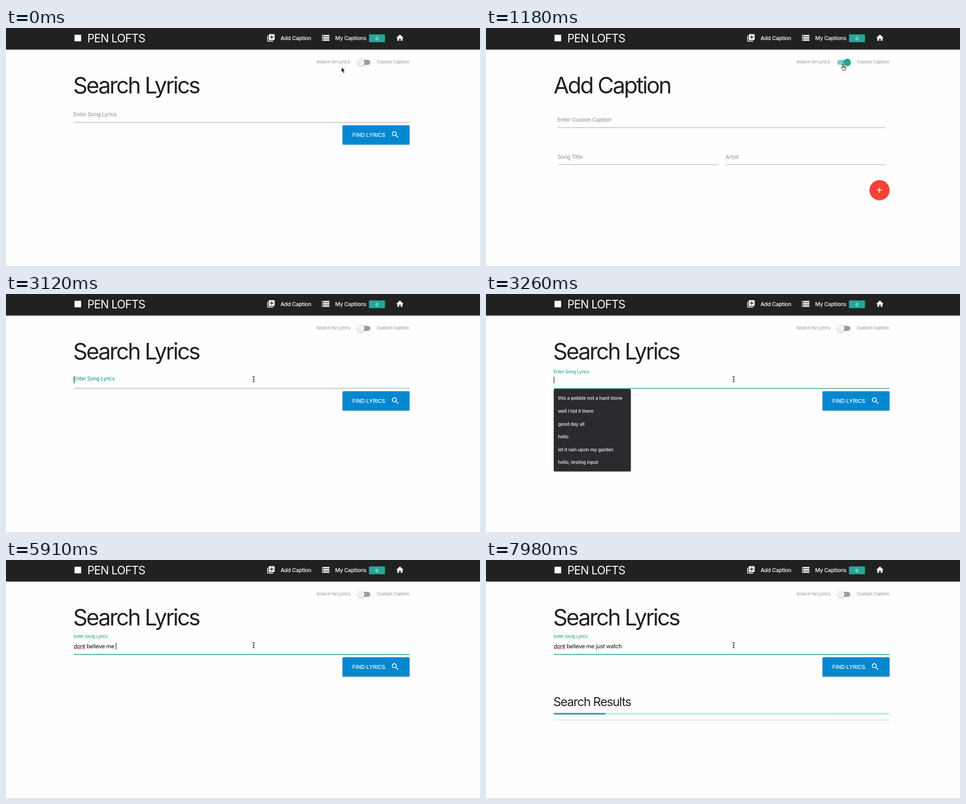
Animation, 1056 px wide and 531 px high, one loop 8 s. Source, as an HTML page:

```html
<!DOCTYPE html>
<html lang="en">
<head>
<meta charset="utf-8">
<title>Caption search</title>
<style>
  html, body { margin: 0; width: 100%; height: 100%; overflow: hidden; background: #fefefe; }
  svg { display: block; width: 100vw; height: 100vh; }
  text {
    font: 450 12px Inter, "Liberation Sans", sans-serif;
    font-optical-sizing: none;
    letter-spacing: -.021em;
    white-space: pre;
    fill: #9e9e9e;
  }
  .nav text, .btn text { fill: #fff; }
  .nav .brand { font-size: 25.1px; font-weight: 400; letter-spacing: -.036em; }
  .nav .count { font-size: 9.6px; text-anchor: middle; }
  .small text { font-size: 9.57px; letter-spacing: -.012em; }
  .title { font-size: 50.2px; font-weight: 400; letter-spacing: -.0605em; fill: #212121; }
  .subtitle { font-size: 27.3px; font-weight: 400; letter-spacing: -.05em; fill: #212121; }
  .btn text { letter-spacing: 0; }
  #typed { font-size: 12.76px; font-weight: 400; letter-spacing: -.028em; fill: #111; }
  #menu text { font-size: 10.4px; font-weight: 500; letter-spacing: -.01em; fill: #f1f1f1; }
  .lift { filter: drop-shadow(0 1.4px 1.3px rgba(0,0,0,.3)); }
  .bar { filter: drop-shadow(0 1.2px 1.2px rgba(0,0,0,.4)); }
  .line { stroke: #9e9e9e; stroke-width: 1; }
</style>
</head>
<body>
<svg viewBox="0 0 1056 531" preserveAspectRatio="none">
  <defs>
    <path id="add-box" d="M4 6H2v14c0 1.1.9 2 2 2h14v-2H4V6zm16-4H8c-1.1 0-2 .9-2 2v12c0 1.1.9 2 2 2h12c1.1 0 2-.9 2-2V4c0-1.1-.9-2-2-2zm-1 9h-4v4h-2v-4H9V9h4V5h2v4h4v2z"/>
    <path id="rows" d="M2 20h20v-4H2v4zm2-3h2v2H4v-2zM2 4v4h20V4H2zm4 3H4V5h2v2zm-4 7h20v-4H2v4zm2-3h2v2H4v-2z"/>
    <path id="house" d="M10 20v-6h4v6h5v-8h3L12 3 2 12h3v8z"/>
    <path id="lens" d="M15.5 14h-.79l-.28-.27C15.41 12.59 16 11.11 16 9.5 16 5.91 13.09 3 9.5 3S3 5.91 3 9.5 5.91 16 9.5 16c1.61 0 3.09-.59 4.23-1.57l.27.28v.79l5 4.99L20.49 19l-4.99-5zm-6 0C7.01 14 5 11.99 5 9.5S7.01 5 9.5 5 14 7.01 14 9.5 11.99 14 9.5 14z"/>
    <path id="plus" d="M19 13h-6v6h-2v-6H5v-2h6V5h2v6h6v2z"/>
  </defs>

  <rect width="1056" height="531" fill="#fefefe"/>

  <g class="nav" fill="#fff">
    <rect class="bar" x="-10" y="-10" width="1076" height="57.8" fill="#212121"/>
    <rect x="152.6" y="15" width="14.8" height="14.8" rx="1.5"/>
    <text class="brand" x="181.2" y="32">PEN LOFTS</text>
    <use href="#add-box" transform="translate(580.4 12.1) scale(.825)"/>
    <text x="611.7" y="26.8">Add Caption</text>
    <use href="#rows" transform="translate(702.4 12.1) scale(.825)"/>
    <text x="733.2" y="26.8">My Captions</text>
    <rect x="808.6" y="14.2" width="35.8" height="17.6" rx="1.6" fill="#26a69a"/>
    <text class="count" x="826.3" y="26.6">0</text>
    <use href="#house" transform="translate(867.7 12.1) scale(.825)"/>
  </g>

  <g class="small">
    <text x="691.3" y="79.2">Search for Lyrics</text>
    <text x="826.2" y="79.2">Custom Caption</text>
  </g>
  <rect id="track" x="782.5" y="71" width="29.2" height="11.5" rx="5.75"/>
  <circle id="ripple" cy="76.8" r="19.5" fill="#26a69a" opacity=".1"/>
  <circle id="thumb" class="lift" cy="76.8" r="8.2"/>

  <g id="search">
    <text class="title" x="149.5" y="146">Search Lyrics</text>
    <rect id="underline" x="151" y="209.8" width="748"/>
    <text id="label">Enter Song Lyrics</text>
    <text id="typed" x="150.7" y="196.6"></text>
    <path id="squiggle" fill="none" stroke="#e53935" stroke-width="1"/>
    <rect id="caret" y="184.5" width="1.1" height="15" fill="#000"/>
    <g class="btn" fill="#fff">
      <rect class="lift" x="749.7" y="217" width="149.3" height="43" rx="1.7" fill="#0288d1"/>
      <text x="771.6" y="242.8">FIND LYRICS</text>
      <use href="#lens" transform="translate(857.3 228.1) scale(.825)"/>
    </g>
    <g id="results">
      <text class="subtitle" x="149.9" y="326.3">Search Results</text>
      <rect x="151" y="341.3" width="748" height="3.4" rx="1.6" fill="#acece6"/>
      <rect x="151" y="341.3" width="115" height="3.4" rx="1" fill="#26a69a"/>
      <rect x="151" y="356.3" width="748" height="1.6" fill="#e0e0e0"/>
    </g>
    <g id="menu">
      <rect class="lift" x="151" y="211.7" width="171.6" height="184" rx="3" fill="#2a2b2f"/>
    </g>
  </g>

  <g id="custom">
    <text class="title" x="150.5" y="146">Add Caption</text>
    <text x="159.2" y="209.2">Enter Custom Caption</text>
    <text x="159.4" y="291.7">Song Title</text>
    <text x="533.7" y="291.7">Artist</text>
    <path class="line" d="M160 222.2H890M160 304.7H516M534 304.7H890"/>
    <circle class="lift" cx="876.7" cy="361.7" r="22.3" fill="#f44336"/>
    <use href="#plus" fill="#fff" transform="translate(866.6 351.8) scale(.825)"/>
  </g>

  <g id="pointer">
    <path id="arrow" fill="#000" stroke="#fff" stroke-width=".8" d="M0 0V11.3L2.6 8.9 4.6 13.6 6.6 12.7 4.6 8.2H8.1Z"/>
    <path id="hand" fill="#fff" stroke="#000" stroke-width="1" stroke-linejoin="round" transform="translate(-4.2 -1)" d="M3.1 8.2V1.9a1.1 1.1 0 0 1 2.2 0V6a1 1 0 0 1 1.9.1a1 1 0 0 1 1.8.5a1 1 0 0 1 1.7.8V10c0 1.6-.8 2.2-1 4H4.2C3.8 12.4 1.6 10.4.6 8.6c-.4-1.2.9-1.7 1.5-1zM5.3 6V8.6M7.2 6.2V8.6M9 6.6V8.6"/>
    <path id="beam" fill="none" stroke="#222" stroke-width="1.2" d="M-2.8-6Q0-6 0-4.5V4.5Q0 6-2.8 6M2.8-6Q0-6 0-4.5M2.8 6Q0 6 0 4.5M-1.6.9H1.6"/>
  </g>
</svg>
<script>
const LOOP = 8000, STEP = 147.85;
const PHRASE = 'dont believe me just watch';
// step at which each character of the phrase is typed
const KEYS = [25, 27, 28, 29, 30, 30, 32, 33, 34, 35, 36, 37, 38, 38, 39, 40, 41, 42, 43, 44, 45, 45, 47, 47, 49, 50];
// pointer hotspot: step, x, y
const PATH = [[0, 747.5, 87.5], [5, 795, 81.2], [9, 795, 81.2], [11, 800.8, 80.8], [15, 800.8, 80.8], [20, 551.8, 190]];
const HISTORY = [
  'this a pebble not a hard stone', 'well I hid it there', 'good day all',
  'hello', 'let it rain upon my garden', 'hello, testing input'
];
const TEAL = [38, 166, 154], GREY = [158, 158, 158];

const $ = id => document.getElementById(id);
const clamp = v => Math.min(1, Math.max(0, v));
const lerp = (a, b, p) => a + (b - a) * p;
const mix = (a, b, p) => `rgb(${a.map((v, i) => Math.round(lerp(v, b[i], p)))})`;
const show = (id, on) => { $(id).style.display = on ? '' : 'none'; };
const set = (id, attrs) => {
  for (const name in attrs) $(id).setAttribute(name, attrs[name]);
};

HISTORY.forEach((line, i) => {
  const item = document.createElementNS('http://www.w3.org/2000/svg', 'text');
  item.setAttribute('x', 160.5);
  item.setAttribute('y', 236.2 + i * 28.65);
  item.textContent = line;
  $('menu').append(item);
});

let wave = 'M151 198.6';
for (let i = 1; i <= 17; i++) wave += `L${151 + i * 1.53} ${i % 2 ? 197.4 : 198.6}`;
set('squiggle', { d: wave });

function pointerAt(k) {
  let i = 0;
  while (i < PATH.length - 2 && k > PATH[i + 1][0]) i++;
  const [k0, x0, y0] = PATH[i], [k1, x1, y1] = PATH[i + 1];
  const u = clamp((k - k0) / (k1 - k0)), p = u * u * (3 - 2 * u);
  return [lerp(x0, x1, p), lerp(y0, y1, p)];
}

function drawSwitch(k) {
  const on = k < 13 ? clamp((k - 6) / 2) : 1 - clamp((k - 13.32) / 2);
  const x = lerp(790.6, 804.8, on);
  set('thumb', { cx: x, fill: mix([241, 241, 241], TEAL, on) });
  set('track', { fill: mix(GREY, [132, 199, 193], on) });
  set('ripple', { cx: x });
  show('ripple', k === 6 || k === 13);
}

function drawInput(k) {
  const focus = clamp((k - 20.8) / 2), p = 1 - (1 - focus) ** 2;
  const focused = focus > 0;
  $('label').style.fontSize = lerp(12, 9.6, p) + 'px';
  $('label').style.fill = mix(GREY, TEAL, focused ? 1 : 0);
  set('label', { x: lerp(150.2, 150.4, p), y: lerp(197.1, 173.7, p) });
  set('underline', { height: lerp(1, 1.8, p), fill: mix(GREY, TEAL, p) });

  $('typed').textContent = PHRASE.slice(0, KEYS.filter(s => s <= k).length);
  const end = $('typed').textContent ? $('typed').getComputedTextLength() : 0;
  set('caret', { x: 151 + end });
  show('caret', focused && k < 53);
  show('squiggle', k >= 30);
  show('menu', k >= 22 && k < 26);
  show('results', k >= 54);
}

function drawPointer(k) {
  const [x, y] = pointerAt(k);
  const shape = k >= 3 && k <= 15 ? 'hand' : y > 178 ? 'beam' : 'arrow';
  set('pointer', { transform: `translate(${x} ${y})` });
  for (const id of ['arrow', 'hand', 'beam']) show(id, id === shape);
}

function draw() {
  const k = Math.min(54, Math.floor((performance.now() % LOOP + 10) / STEP));
  const custom = k >= 7 && k < 14;
  show('custom', custom);
  show('search', !custom);
  drawSwitch(k);
  if (!custom) drawInput(k);
  drawPointer(k);
  requestAnimationFrame(draw);
}
draw();
</script>
</body>
</html>
```
